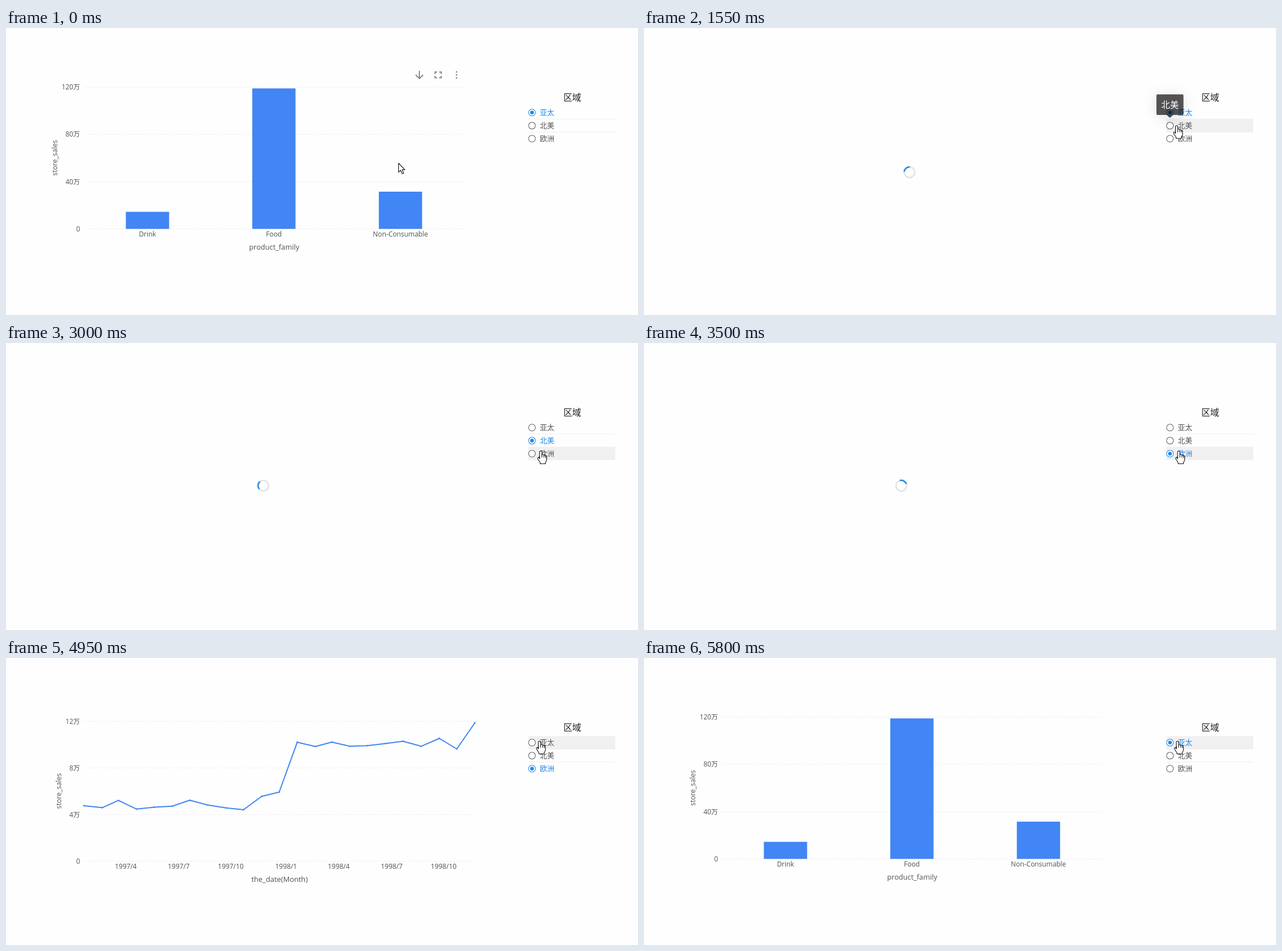
Write an HTML page that moves like this. It is 1110 by 505 pixels and loops after 7000 ms.

```html
<!DOCTYPE html>
<html lang="zh">
<head>
<meta charset="utf-8">
<title>Chart switcher</title>
<style>
  html, body { margin: 0; width: 100%; height: 100%; overflow: hidden; background: #fefefe; }
  svg { display: block; width: 100%; height: 100%; }
  text { font-family: "Open Sans", "Noto Sans CJK SC", "Noto Sans", sans-serif; }
</style>
</head>
<body>
<svg id="stage" viewBox="0 0 1110 505"></svg>
<script>
const LOOP = 7000;
const BLUE = '#4285f4', ACCENT = '#2088e8', GREY = '#525252';
const stage = document.getElementById('stage');

function add(parent, tag, attrs = {}, content) {
  const el = document.createElementNS('http://www.w3.org/2000/svg', tag);
  for (const key in attrs) el.setAttribute(key, attrs[key]);
  if (content !== undefined) el.textContent = content;
  parent.appendChild(el);
  return el;
}
const group = (parent = stage, attrs = {}) => add(parent, 'g', attrs);
const show = (el, on) => el.setAttribute('display', on ? 'inline' : 'none');
const clamp = v => Math.max(0, Math.min(1, v));
const easeOut = v => 1 - (1 - clamp(v)) ** 3;
const easeInOut = v => v < 0.5 ? 4 * v ** 3 : 1 - 4 * (1 - v) ** 3;

// cy is the vertical centre of the capitals
function label(parent, str, x, cy, size = 11.9, anchor = 'middle', fill = GREY) {
  return add(parent, 'text', { x, y: cy + size * 0.36, 'font-size': size, 'text-anchor': anchor, fill }, str);
}
function axisName(parent, str, x, cy) {
  add(parent, 'text', {
    transform: `translate(${x} ${cy}) rotate(-90)`, 'font-size': 12.2, 'text-anchor': 'middle', fill: GREY
  }, str);
}
function grid(parent, top, step, right, names) {
  names.forEach((name, i) => {
    const y = top + i * step;
    add(parent, 'path', { d: `M137 ${y}H${right}`, stroke: '#efefef', 'stroke-dasharray': '4 2' });
    label(parent, name, 130, y, 11.9, 'end');
  });
}

// Bar chart
const barChart = group();
grid(barChart, 104, 83.2, 805, ['120万', '80万', '40万', '0']);
axisName(barChart, 'store_sales', 90, 228.5);
label(barChart, 'product_family', 471, 385.5, 12.7);
const BASE = 353.5;
const bars = [['Drink', 248.5, 323.5], ['Food', 470.5, 106.3], ['Non-Consumable', 692.8, 288]].map(([name, x, top]) => {
  label(barChart, name, x, 363);
  return { top, el: add(barChart, 'rect', { x: x - 38, width: 76, fill: BLUE }) };
});
function drawBars(k) {
  for (const { top, el } of bars) {
    const h = (BASE - top) * k;
    el.setAttribute('y', BASE - h);
    el.setAttribute('height', h);
  }
}

// Toolbar over the bar chart
const tools = group(stage, { fill: 'none', stroke: '#808080', 'stroke-width': 1.8 });
add(tools, 'path', { d: 'M726 75.5V88.5M719.5 82.5L726 89L732.5 82.5' });
add(tools, 'path', { d: 'M757 77.5H753.5V81M761 77.5H764.5V81M757 87.5H753.5V84M761 87.5H764.5V84' });
for (const y of [77.3, 82.6, 87.9]) add(tools, 'circle', { cx: 791.3, cy: y, r: 1.3, fill: '#808080', stroke: 'none' });

// Pie chart
const pieChart = group();
const PIE = { x: 465.75, y: 240.25, r: 102.75 };
const polar = (deg, r) => {
  const a = deg * Math.PI / 180;
  return [PIE.x + r * Math.sin(a), PIE.y - r * Math.cos(a)];
};
let angle = 0;
const slices = [
  ['Large Independent', 53.4, BLUE], ['Large Owned', 120.6, '#db4437'], ['Medium Independent', 175.2, '#f4b400'],
  ['Medium Owned', 213.5, '#0f9d58'], ['Small Independent', 269.2, '#ab47bc'], ['Small Owned', 360, '#00acc1']
].map(([name, to, color]) => {
  const from = angle, mid = (from + to) / 2, side = mid < 180 ? 1 : -1;
  angle = to;
  const el = add(pieChart, 'path', { fill: color });
  const note = group(pieChart);
  const [x, y] = polar(mid, PIE.r + 9.5);
  add(note, 'path', { d: `M${polar(mid, PIE.r)}L${x} ${y}h${5 * side}`, fill: 'none', stroke: color });
  label(note, name, x + 9.5 * side, y, 9.8, side > 0 ? 'start' : 'end', '#444');
  return { name, color, from, to, mid, el, note };
});
[258, 387, 485].forEach((x, i) => {
  add(pieChart, 'circle', { cx: x, cy: 386.5, r: 5.9, fill: slices[i].color });
  label(pieChart, slices[i].name, x + 10.3, 387, 11.75, 'start', '#3c3c3c');
});
add(pieChart, 'path', { d: 'M634 379V394L624.5 386.5Z', fill: '#aaa' });
label(pieChart, '1/3', 652.3, 387, 11.75, 'middle', '#333');
add(pieChart, 'path', { d: 'M670.5 379V394L680 386.5Z', fill: '#2b3a48' });
function drawPie(k) {
  const sweep = 360 * k;
  for (const { from, to, mid, el, note } of slices) {
    const end = Math.min(to, sweep);
    el.setAttribute('d', end > from
      ? `M${PIE.x} ${PIE.y}L${polar(from, PIE.r)}A${PIE.r} ${PIE.r} 0 0 1 ${polar(end, PIE.r)}Z` : '');
    show(note, sweep >= mid);
  }
}

// Line chart
const lineChart = group();
grid(lineChart, 111.5, 82, 823, ['12万', '8万', '4万', '0']);
axisName(lineChart, 'store_sales', 97, 234);
label(lineChart, 'the_date(Month)', 480.5, 389.5, 12.8);
['1997/4', '1997/7', '1997/10', '1998/1', '1998/4', '1998/7', '1998/10'].forEach((name, i) =>
  label(lineChart, name, [210.5, 303.5, 394.7, 492, 584.5, 677.5, 768.7][i], 366.5));
const START = 137, SPAN = 686.5;
const monthX = m => START + (Date.UTC(1997, m, 1) - Date.UTC(1997, 0, 1)) / 864e5 * 1.0262;
const points = [260, 263.3, 250.7, 265.8, 262.5, 260.7, 250.3, 258.8, 263.8, 267, 243.5, 236,
  148.2, 155.8, 148, 155.3, 154.2, 150.5, 146.5, 155.3, 141.5, 160, 114].map((y, m) => [monthX(m), y]);
const clip = add(add(stage, 'clipPath', { id: 'reveal' }), 'rect', { x: 130, y: 95, height: 270 });
add(lineChart, 'path', {
  d: 'M' + points.join('L'), fill: 'none', stroke: BLUE, 'stroke-width': 2,
  'stroke-linejoin': 'bevel', 'clip-path': 'url(#reveal)'
});
const dots = points.map(([x, y]) => ({ x, el: add(lineChart, 'circle', { cx: x, cy: y, fill: BLUE }) }));
function drawLine(k) {
  const tip = START + SPAN * k;
  clip.setAttribute('width', k < 1 ? tip - 130 : 710);
  for (const { x, el } of dots) el.setAttribute('r', 1.4 * clamp((tip + 12 - x) / 12));
}

// Loading ring
const spinner = group(stage, { fill: 'none', 'stroke-width': 2.6 });
add(spinner, 'circle', { r: 9.3, stroke: '#e3e3e3' });
add(spinner, 'path', { d: 'M-6.58 -6.58A9.3 9.3 0 0 1 6.58 -6.58', stroke: '#2b8cec' });

// Region filter
label(stage, '区域', 994.5, 122.7, 15.6, 'middle', '#222');
const ROW_TOP = 137.5, ROW_H = 22.9;
for (const y of [160, 183]) add(stage, 'path', { d: `M917 ${y}H1070`, stroke: '#eee' });
const hover = add(stage, 'rect', { x: 917.5, width: 152.5, height: ROW_H, fill: '#f0f0f0' });
const filter = group(stage, { 'font-weight': 300 });
const rows = ['亚太', '北美', '欧洲'].map((name, i) => {
  const cy = 148.8 + i * 22.95;
  return {
    ring: add(filter, 'circle', { cx: 923.8, cy, r: 6, fill: '#fff', 'stroke-width': 1.1 }),
    dot: add(filter, 'circle', { cx: 923.8, cy, r: 3.3, fill: ACCENT }),
    text: label(filter, name, 937.5, cy - 0.4, 12.8, 'start')
  };
});

// Tooltip
const tip = group(stage, { style: 'filter:drop-shadow(0 3px 12px rgba(0,0,0,.16))' });
add(tip, 'path', {
  d: 'M902 116.8H945.5Q947.5 116.8 947.5 118.8V151Q947.5 153 945.5 153H929L923.6 158.2L918.2 153H902Q900 153 900 151V118.8Q900 116.8 902 116.8Z',
  fill: 'rgba(0,0,0,.66)'
});
label(tip, '北美', 923.7, 135, 15.5, 'middle', '#fff');

// Pointers, with their tips at the origin
const ink = { fill: '#fff', stroke: '#111', 'stroke-width': 1.1, 'stroke-linejoin': 'round' };
const arrow = add(stage, 'path', { ...ink, d: 'M0 0V15.8L3.7 12.4L6.5 18.6L9 17.5L6.3 11.4H11Z' });
const hand = group(stage, ink);
add(hand, 'path', {
  d: 'M-2 2Q-2 0 0 0T2 2V7.5Q2 6 3.8 6T5.6 8Q5.6 6.9 7 6.9T8.5 9Q8.8 8 9.6 8.3T10.4 10V15Q10.4 18 8.2 20V22.5H-1V20.5L-5.2 14Q-6 12.4 -4.8 11.5T-3 12.2L-2 13.5Z'
});
add(hand, 'path', { d: 'M2 7.5V11.5M5.6 8V11.5M8.5 9V12M-2 13.5V9', fill: 'none' });

const track = [
  [50, 689.5, 238], [720, 936, 172], [800, 936, 172], [850, 935.5, 171.8], [2100, 935.5, 171.8],
  [2550, 938, 188], [2700, 938, 188], [2850, 939.2, 190], [4500, 939.2, 190], [4750, 937, 146.3]
];
function pointerAt(t) {
  if (t <= track[0][0]) return track[0].slice(1);
  for (let i = 1; i < track.length; i++) {
    const [t0, x0, y0] = track[i - 1], [t1, x1, y1] = track[i];
    if (t < t1) {
      const k = easeInOut((t - t0) / (t1 - t0));
      return [x0 + (x1 - x0) * k, y0 + (y1 - y0) * k];
    }
  }
  return track[track.length - 1].slice(1);
}

// Click, data ready, selection moved, ring centre
const loads = [
  { click: 1350, ready: 1650, select: 1700, at: [466.2, 253.8] },
  { click: 3000, ready: 3600, select: 3400, at: [452, 251] },
  { click: 5150, ready: 5450, select: 5450, at: [452, 251] }
];

function render(t) {
  const load = loads.find(l => t >= l.click && t < l.ready);
  const loaded = loads.filter(l => t >= l.ready).length;
  [barChart, pieChart, lineChart].forEach((chart, i) => show(chart, !load && loaded % 3 === i));
  drawBars(loaded === 3 ? easeOut((t - 5450) / 340) : 1);
  drawPie(easeOut((t - 1650) / 290));
  drawLine(clamp((t - 3626) / 906));

  show(spinner, load);
  if (load) spinner.setAttribute('transform', `translate(${load.at}) rotate(${-85 + (t - load.click) * 0.225})`);

  const [x, y] = pointerAt(t);
  const row = Math.floor((y - ROW_TOP) / ROW_H);
  const over = x > 917 && row >= 0 && row < 3;
  show(hover, over);
  if (over) hover.setAttribute('y', ROW_TOP + row * ROW_H);
  show(arrow, !over);
  show(hand, over);
  (over ? hand : arrow).setAttribute('transform', `translate(${x} ${y})`);
  show(tools, t < 1350 && x < 840);

  const selected = loads.filter(l => t >= l.select).length % 3;
  rows.forEach(({ ring, dot, text }, i) => {
    const on = i === selected;
    ring.setAttribute('stroke', on ? ACCENT : '#666');
    text.setAttribute('fill', on ? ACCENT : GREY);
    show(dot, on);
  });

  show(tip, t >= 660 && t < 1700);
  tip.setAttribute('opacity', clamp((t - 660) / 120));
}

const begin = performance.now();
function frame() {
  render((performance.now() - begin) % LOOP);
  requestAnimationFrame(frame);
}
render(0);
requestAnimationFrame(frame);
</script>
</body>
</html>
```
